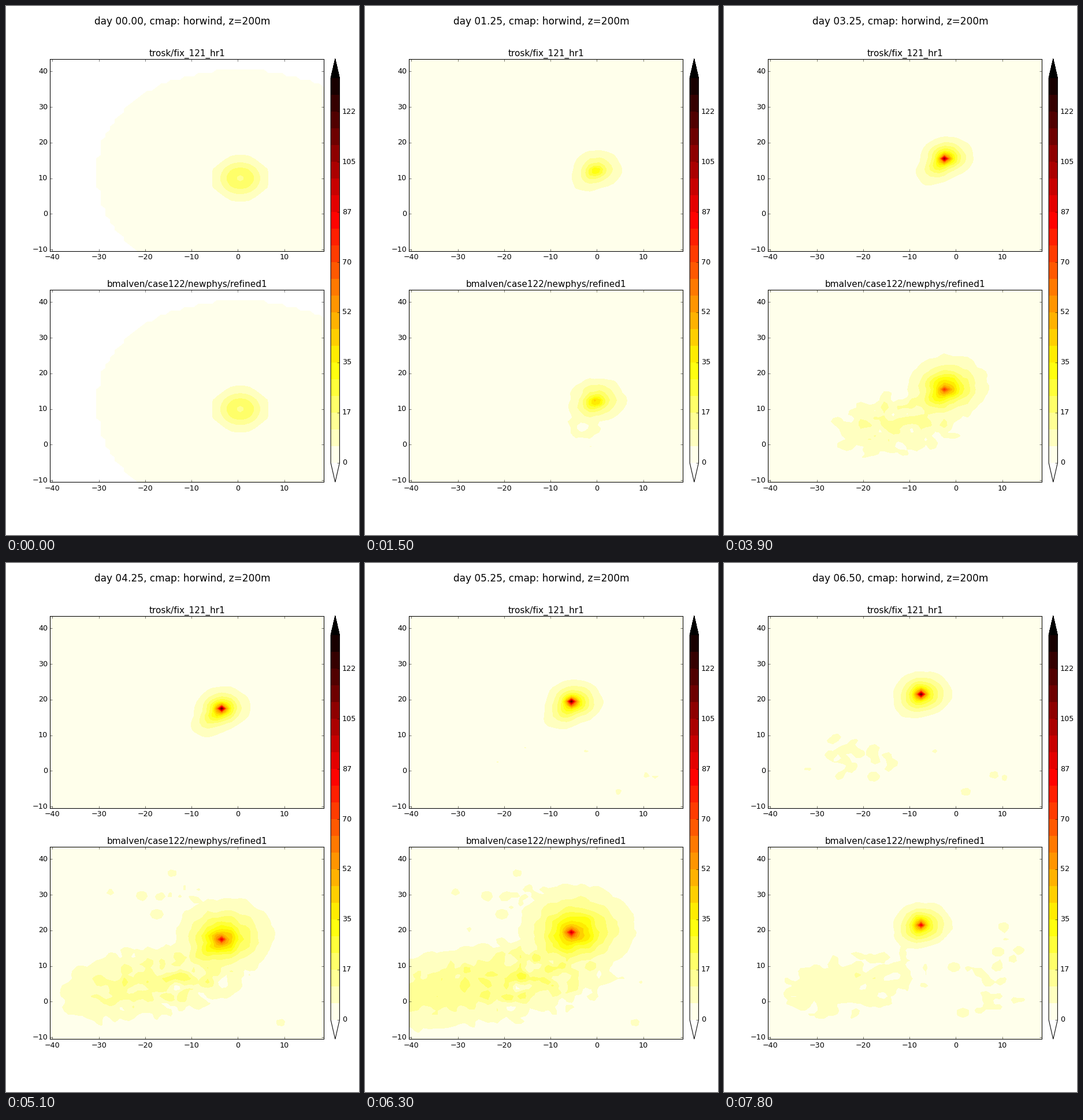
Recreate the animation shown at these times as a matplotlib script. Size 611 by 917 pixels, loop 8 s.

```python
import numpy as np
import matplotlib.pyplot as plt
from matplotlib.animation import FuncAnimation
from matplotlib.cm import ScalarMappable
from matplotlib.colors import BoundaryNorm, ListedColormap

plt.style.use("classic")
plt.rcParams["font.family"] = "DejaVu Sans"

WIDTH, HEIGHT, DPI = 611, 917, 76.4
LOW = 35 / 6
LEVELS = np.arange(24) * 35 / 6
X, Y = np.meshgrid(np.arange(-40.5, 19), np.arange(-10.5, 44))

rng = np.random.default_rng(7)
WAVES = list(zip(*rng.uniform(0, 2 * np.pi, (2, 40)),
                 2 * np.pi / rng.uniform(2.4, 6.5, 40)))


def bell(angle, centre, sharpness):
    """Periodic bump of height 1 around a direction in degrees."""
    return np.exp(sharpness * (np.cos(angle - np.radians(centre)) - 1))


def turbulence(day):
    """Smooth noise of unit spread, carried westward."""
    total = np.zeros_like(X)
    for angle, phase, number in WAVES:
        along = (X + 4 * day) * np.cos(angle) + Y * np.sin(angle)
        total += np.cos(number * along + phase + day * np.sin(3 * phase))
    return np.clip(total / np.sqrt(len(WAVES) / 2), -2.5, 2.5)


def initial_wind():
    """Calm-eyed ring inside a disc on the sphere."""
    ring = np.interp(np.hypot((X - 0.5) * 1.03, Y - 10),
                     [0, 0.9, 2, 3.05, 4.35, 5.95, 45],
                     [14, 17.5, 20.5, 17.5, 11.67, LOW, 0.1])
    lat, lon, lat0 = np.radians(Y), np.radians(X - 0.5), np.radians(10)
    arc = np.arccos(np.clip(np.sin(lat) * np.sin(lat0)
                            + np.cos(lat) * np.cos(lat0) * np.cos(lon), -1, 1))
    return np.where(np.degrees(arc) < 29.85, ring, 0)


def storm(day, peak, surge=0):
    """Vortex drifting north-west, with a tail and a one-cell core."""
    cx = 0.5 - 0.45 * day - 0.12 * day ** 2
    cy = 10 + 1.75 * day
    angle = np.arctan2(Y - cy, X - cx)
    edge = 4.9 + 0.2 * day + 0.4 * np.cos(angle) + 0.4 * np.sin(angle)
    edge += 3.8 * np.sin(np.pi * day / 7.5) * bell(angle, 235, 6)
    edge += surge * (1 + 0.2 * np.cos(angle - np.radians(60)))
    steep = min(np.log(peak / LOW), 2.4)
    wind = LOW * np.exp(steep * (1 - np.hypot(X - cx, Y - cy) / edge))
    core = np.hypot(X - np.floor(cx) - 0.5, Y - np.floor(cy) - 0.5)
    spike = (peak - LOW * np.exp(steep)) * np.exp(-(core / 0.8) ** 2)
    return wind + spike


def wake(day):
    """Broad band of wind that stretches west, then fades."""
    def stage(*values):
        return np.interp(day, [1.25, 2.25, 5.25, 6.5], values)

    left, right = stage(-5, -12.7, -51, -37), stage(0, 0, 4, -9)
    half_height, strength = stage(3.5, 6.2, 11, 6.8), stage(0.1, 0.5, 1.05, 0.4)
    dx = X - (left + right) / 2
    dy = Y - (8 - 0.5 * day) - 0.2 * dx
    q = np.abs(2 * dx / (right - left)) ** 3 + (dy / half_height) ** 2
    return LOW * np.exp(strength * (1 - q))


def scatter(count, centre, spread, day, drift):
    """Random patches that live for a while around a day."""
    return [(rng.normal(centre, spread), rng.uniform(0.5, 1.4),
             day, rng.uniform(0.4, 2.4), drift) for _ in range(count)]


def patch_wind(patches, day):
    wind = np.zeros_like(X)
    for (x, y), radius, best_day, life, drift in patches:
        age = day - best_day
        weight = np.clip(1.5 * (1 - abs(age) / life), 0, 1)
        d2 = ((X - x - drift * age) ** 2 + (Y - y) ** 2) / radius ** 2
        wind = np.maximum(wind, 9 * weight * np.exp(-0.43 * d2))
    return wind


UPPER_PATCHES = (scatter(24, (-22, 4.5), (5, 3.5), 6.5, -2)
                 + scatter(5, (9, 4), (6, 6), 6, -2))
LOWER_PATCHES = (scatter(20, (-18, 30), (4.5, 3), 5, -3)
                 + scatter(24, (8, 7), (5, 7), 6.5, -2)
                 + scatter(5, (14, -8), (4, 2), 4.5, -1))


def mix_from_start(wind, day):
    blend = min(day / 1.25, 1)
    return INITIAL * (1 - blend) + np.maximum(wind, 0.5) * blend


def upper_wind(day):
    peak = 25 + 97 * min(1, (day / 3.4) ** 2)
    wind = storm(day, peak) * (1 + 0.04 * turbulence(day))
    return mix_from_start(np.maximum(wind, patch_wind(UPPER_PATCHES, day)), day)


def lower_wind(day):
    noise = turbulence(day)
    peak = 25 + 70 * min(1, day / 4.25)
    surge = np.interp(day, [0, 2, 5.25, 6.5], [0.8, 0.8, 6.3, 0])
    gusts = np.interp(X, [-38, -15], [0.08, 0.28])
    wind = np.maximum(storm(day, peak, surge) * (1 + 0.06 * noise),
                      wake(day) * (1 + gusts * noise))
    return mix_from_start(np.maximum(wind, patch_wind(LOWER_PATCHES, day)), day)


INITIAL = initial_wind()
cmap = ListedColormap(plt.get_cmap("hot_r")((np.arange(23) + 0.5) / 23))
cmap.set_under("white")
cmap.set_over("black")
norm = BoundaryNorm(LEVELS, 23)

fig, axes = plt.subplots(2, 1, dpi=DPI, facecolor="white",
                         figsize=((WIDTH + 0.01) / DPI, (HEIGHT + 0.01) / DPI))
fig.subplots_adjust(left=0.125, right=0.9, bottom=0.1, top=0.9, hspace=0.2)
heading = fig.suptitle("", fontsize=16)
for ax, name in zip(axes, ["trosk/fix_121_hr1",
                           "bmalven/case122/newphys/refined1"]):
    ax.set_title(name)
    ax.set(xlim=(-40.5, 18.5), ylim=(-10.5, 43.5),
           xticks=range(-40, 11, 10), yticks=range(-10, 41, 10))

cax = fig.add_axes([0.92, 0.1, 0.025, 0.8])
bar = fig.colorbar(ScalarMappable(norm, cmap), cax=cax, extend="both",
                   ticks=LEVELS[::3], format="%d")
bar.minorticks_off()

contours = []


def update(frame):
    day = frame // 3 * 0.25
    heading.set_text(f"day {day:05.2f}, cmap: horwind, z=200m")
    while contours:
        contours.pop().remove()
    for ax, wind in zip(axes, (upper_wind, lower_wind)):
        contours.append(ax.contourf(X, Y, wind(day), LEVELS, cmap=cmap,
                                    norm=norm, extend="both"))
    return [heading]


animation = FuncAnimation(fig, update, frames=80, interval=100,
                          init_func=lambda: update(0), repeat=True,
                          repeat_delay=0, blit=False)
plt.show()
```
